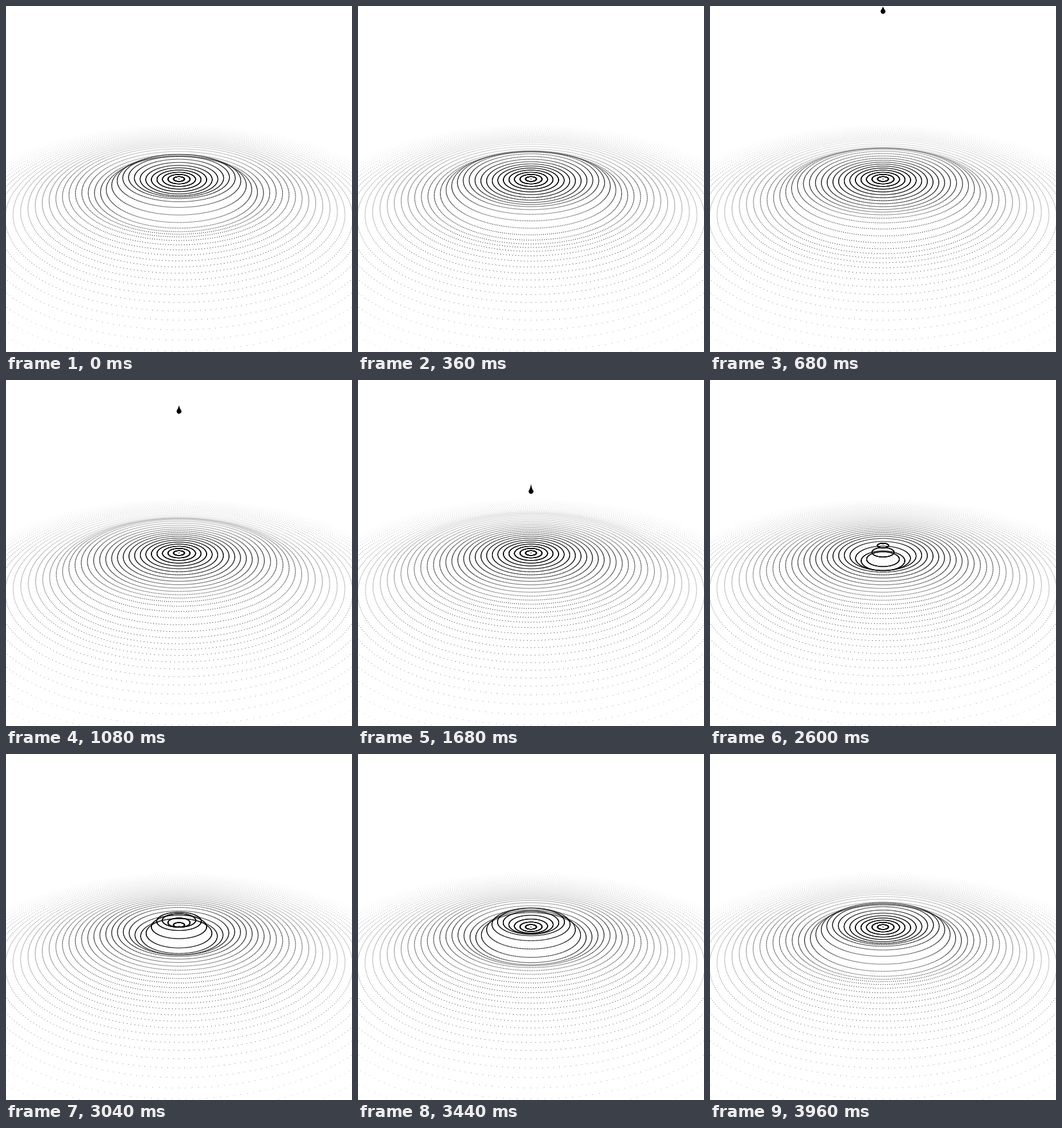
Recreate the animation shown at these times as an HTML page with a canvas. Size 540x540 px, loop 4000 ms.

```html
<!DOCTYPE html>
<html lang="en">
<head>
<meta charset="utf-8">
<title>Drop and ripple</title>
<style>
  html, body { margin: 0; height: 100%; overflow: hidden; background: #fff; }
  canvas { display: block; width: 540px; height: 540px; }
</style>
</head>
<body>
<canvas id="stage" width="540" height="540"></canvas>
<script>
const ctx = document.getElementById('stage').getContext('2d');
const LOOP = 4000, IMPACT = 1980;
const SIZE = 540, MID = SIZE / 2;
const CAMERA = MID / Math.tan(Math.PI / 6);
const TILT = 25.5 * Math.PI / 180;
const SIN = Math.sin(TILT), COS = Math.cos(TILT);
const RINGS = 38, GAP = 8.58, DOTS = 360, FADE_RADIUS = 330, DOT = 1.1;

const directions = Array.from({ length: DOTS }, (_, i) => {
  const angle = Math.PI / 2 + i * 2 * Math.PI / DOTS;
  return [Math.cos(angle), Math.sin(angle)];
});

const smooth = p => {
  p = Math.min(1, Math.max(0, p));
  return p * p * (3 - 2 * p);
};

// One spreading pulse: a leading trough followed by a crest.
function pulse(r, age) {
  if (age <= 0) return 0;
  const crest = 0.0555 * age - 30;
  const width = 11 + 0.0043 * age;
  const x = (r - crest - width) / width;
  const strength = 13 * Math.exp(-((Math.max(0, crest) / 130) ** 2));
  const peak = 1 + 0.3 * Math.exp(-((r / 8) ** 2));
  return -strength * peak * smooth(age / 250) * x * Math.exp(0.5 - x * x / 2);
}

// Each pulse outlives the loop, so the previous one is still travelling.
const height = (r, t) => pulse(r, t - IMPACT) + pulse(r, t - IMPACT + LOOP);

function drawRing(r, t) {
  const h = height(r, t);
  const fade = 1 - (r / FADE_RADIUS) ** 2;
  for (const [dx, dz] of r ? directions : directions.slice(0, 2)) {
    const z = r * dz;
    const scale = CAMERA / (CAMERA - z * COS - h * SIN);
    const x = MID + r * dx * scale;
    const y = MID + (z * SIN - h * COS) * scale;
    if (x < -2 || x > SIZE + 2 || y > SIZE + 2) continue;
    ctx.globalAlpha = fade * Math.min(1, scale ** 3);
    ctx.fillRect(x - DOT / 2, y - DOT / 2, DOT, DOT);
  }
}

function drawDrop(t) {
  const s = t / 1000;
  const bottom = -5.4 + 47.4 * s ** 2.6;
  const tip = bottom - 8.5 - 4.2 * s;
  if (bottom < 0 || tip > MID) return;
  const radius = 3.7, cy = bottom - radius;
  ctx.save();
  ctx.beginPath();
  ctx.rect(0, 0, SIZE, MID + 2);
  ctx.clip();
  ctx.globalAlpha = 1;
  ctx.beginPath();
  ctx.moveTo(MID, tip);
  ctx.quadraticCurveTo(MID + 1, cy - 4.5, MID + radius * 0.9, cy - radius * 0.44);
  ctx.arc(MID, cy, radius, -0.45, Math.PI + 0.45);
  ctx.quadraticCurveTo(MID - 1, cy - 4.5, MID, tip);
  ctx.fill();
  ctx.restore();
}

function draw(now) {
  const t = now % LOOP;
  ctx.globalAlpha = 1;
  ctx.fillStyle = '#fff';
  ctx.fillRect(0, 0, SIZE, SIZE);
  ctx.fillStyle = '#000';
  for (let n = 0; n <= RINGS; n++) drawRing(n * GAP, t);
  drawDrop(t);
  requestAnimationFrame(draw);
}
draw(0);
</script>
</body>
</html>
```
